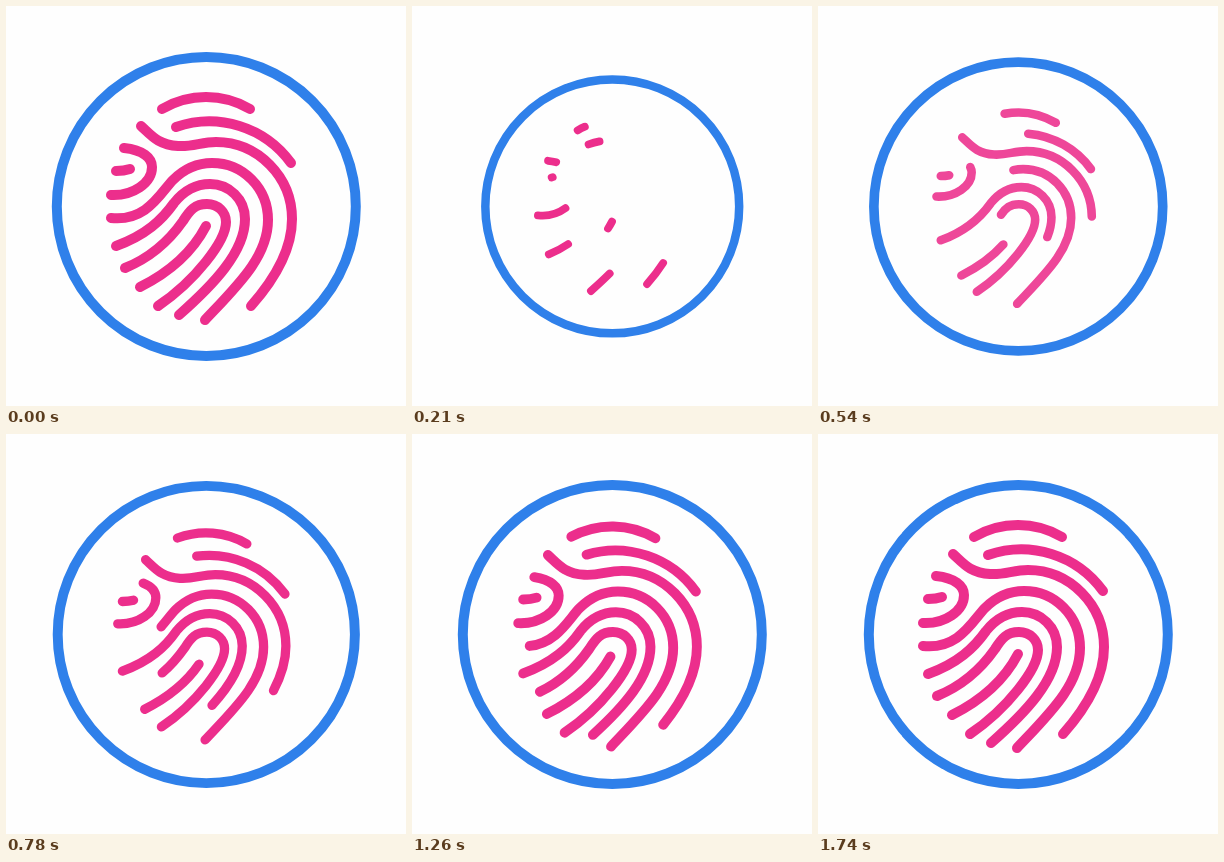
An HTML page for the animation above (2300 ms loop, 400 by 400 pixels).

```html
<!DOCTYPE html>
<html lang="en">
<head>
<meta charset="utf-8">
<title>Fingerprint</title>
<style>
  html, body { margin: 0; height: 100%; overflow: hidden; background: #fefefe; }
  svg { display: block; width: 100%; height: 100%; }
  svg * { fill: none; stroke-width: 10; stroke-linecap: round; }
  #ring { stroke: #2f80ea; }
  #print { stroke: #ec2e8c; stroke-dasharray: 1 2; }
</style>
</head>
<body>
<svg viewBox="0 0 400 400">
  <circle id="ring" cx="200.3" cy="200.5" r="149.5"/>
  <g id="print">
    <path pathLength="1" d="M156 103A87 87 0 0 1 244 103"/>
    <path pathLength="1" d="M170 121A101 101 0 0 1 285 157"/>
    <path pathLength="1" d="M245 300C268 274 286 243 286 213C286 171 252 136 210 136C195 136 187 141 172 140C152 139 145 129 135 120"/>
    <path pathLength="1" d="M118 142C137 144 146 152 146 161C146 177 127 190 105 189"/>
    <path pathLength="1" d="M124 163Q118 165 110 165"/>
    <path pathLength="1" d="M105 212C141 216 155 186 167 174C178 163 191 157 206 157C237 157 262 182 262 214C262 251 231 280 199 314"/>
    <path pathLength="1" d="M173 309C207 279 239 246 239 213C239 193 223 178 204 178C187 178 176 187 168 197C156 214 140 229 110 240"/>
    <path pathLength="1" d="M119 262C146 251 163 235 177 215C184 204 189 198 201 198C212 198 220 206 220 216C220 235 189 275 152 300"/>
    <path pathLength="1" d="M200 220C188 243 168 264 134 281"/>
  </g>
</svg>
<script>
const LOOP = 2300, STEP = 30, END = 1740;
const ring = document.getElementById('ring');
const print = document.getElementById('print');

// Smooth monotone curve through [time, value] points.
function curve(points) {
  const slopes = points.slice(1).map(([t, v], i) => (v - points[i][1]) / (t - points[i][0]));
  const tangents = points.map((_, i) => {
    const a = slopes[i - 1] ?? slopes[i], b = slopes[i] ?? a;
    return a * b > 0 ? 2 * a * b / (a + b) : 0;
  });
  return t => {
    let i = 0;
    while (i < points.length - 2 && t > points[i + 1][0]) i++;
    const [t0, v0] = points[i], [t1, v1] = points[i + 1];
    const d = t1 - t0, u = Math.min(1, (t - t0) / d), w = 1 - u;
    return v0 * w * w * (1 + 2 * u) + v1 * u * u * (3 - 2 * u)
      + d * u * w * (tangents[i] * w - tangents[i + 1] * u);
  };
}

// 0 to 1 wipes the lines out towards their start, 1 to 2 draws them in from their end.
const wipe = curve([[0, 0], [210, .887], [540, 1.67], [780, 1.84], [1020, 1.917], [1260, 1.965], [END, 2]]);
const printShrink = curve([[0, 0], [210, .22], [290, .245], [540, .142], [780, .071], [1020, .032], [1260, .013], [END, 0]]);
const ringShrink = curve([[0, 0], [170, .162], [210, .151], [540, .034], [780, .006], [1080, 0]]);

function resize(el, shrink) {
  el.setAttribute('transform', `translate(200 200) scale(${1 - shrink}) translate(-200 -200)`);
}

function draw(now) {
  const t = Math.min(END, Math.floor(now % LOOP / STEP) * STEP);
  const q = wipe(t);
  resize(ring, ringShrink(t));
  resize(print, printShrink(t));
  print.style.strokeDashoffset = q <= 1 ? q : q - 2;
  const fade = Math.min(1, Math.max(0, (t - 240) / 460));
  print.style.opacity = q <= 1 ? 1 : 1 - (1 - fade) ** 2;
}

const start = performance.now();
function tick() {
  draw(performance.now() - start);
  requestAnimationFrame(tick);
}
tick();
</script>
</body>
</html>
```
